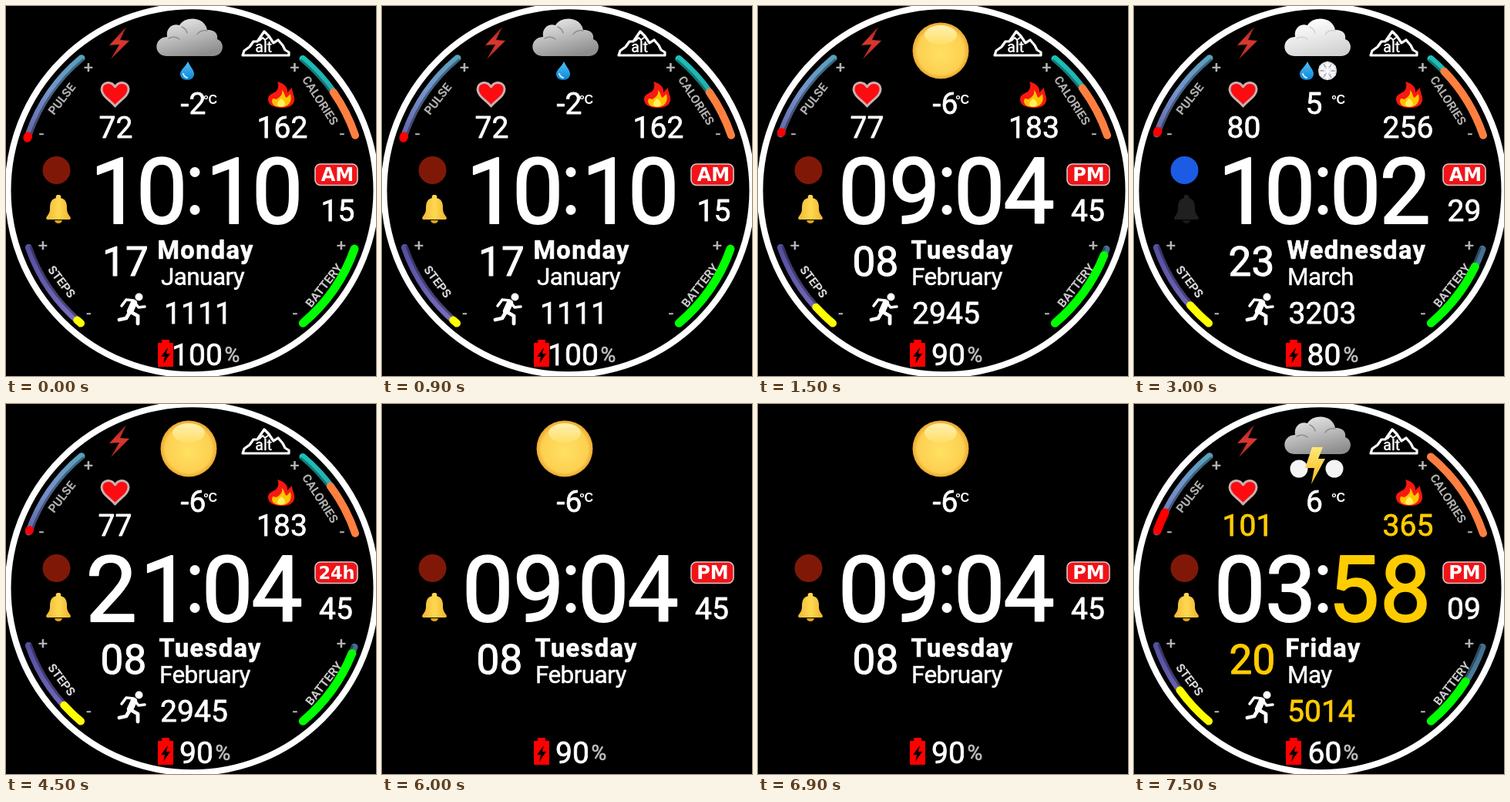
An HTML page with a canvas that plays this animation: 480x480 px, repeating every 8000 ms.

```html
<!DOCTYPE html>
<html lang="en">
<head>
<meta charset="utf-8">
<title>Watch face</title>
<style>
  html, body { margin: 0; width: 100%; height: 100%; overflow: hidden; background: #000; }
  canvas { display: block; width: 480px; height: 480px; }
</style>
</head>
<body>
<canvas id="face" width="480" height="480"></canvas>
<script>
const g = document.getElementById('face').getContext('2d');
const WHITE = '#fff', GOLD = '#ffcc00';
const LOOP = 8000, STEP = 1500;
const CX = 241, CY = 240, GAUGE_R = 224;

// Gauge ends are angles in degrees; text pairs hold [text, ink centre].
const monday = {
  sky: 'rain', temp: ['-2', 242.5], pulse: ['72', 142.5], kcal: ['162', 359.5],
  time: '1010', mode: 'AM', sec: ['15', 431.5], date: ['17', 156],
  day: 'Monday', month: 'January', steps: ['1111', 246.5], power: ['100', 248.5],
  ends: { pulse: 198.4, kcal: -34.9, steps: 131.6, power: 19.6 }
};
const tuesday = {
  sky: 'sun', temp: ['-6', 242.5], pulse: ['77', 141.5], kcal: ['183', 358.5],
  time: '0904', mode: 'PM', sec: ['45', 428], date: ['08', 152],
  day: 'Tuesday', month: 'February', steps: ['2945', 244], power: ['90', 246.5],
  ends: { pulse: 199.8, kcal: -36.6, steps: 137.7, power: 21.9 }
};
const wednesday = {
  sky: 'sleet', temp: ['5', 234], pulse: ['80', 142.5], kcal: ['256', 355.5],
  time: '1002', mode: 'AM', sec: ['29', 428], date: ['23', 152], linked: true, muted: true,
  day: 'Wednesday', month: 'March', steps: ['3203', 244], power: ['80', 246.5],
  ends: { pulse: 200.2, kcal: -43.9, steps: 138.6, power: 26 }
};
const friday = {
  sky: 'storm', temp: ['6', 234.5], pulse: ['101', 145], kcal: ['365', 355.5],
  time: '0358', mode: 'PM', sec: ['09', 428], date: ['20', 153], accent: GOLD,
  day: 'Friday', month: 'May', steps: ['5014', 244], power: ['60', 247.5],
  ends: { pulse: 206.2, kcal: -50, steps: 144.1, power: 32.4 }
};
const scenes = [
  monday, tuesday, wednesday,
  { ...tuesday, time: '2104', mode: '24h' },
  { ...tuesday, ambient: true },
  friday
];

const rad = deg => deg * Math.PI / 180;
const roboto = (size, weight = 400) => `${weight} ${size}px Roboto, sans-serif`;

// Places text by its inked box: side 0 = left edge, 0.5 = centre, 1 = right edge.
// The outline rounds the corners and adds a little weight.
function ink(text, x, y, font, { color = WHITE, side = 0.5, outline = 0 } = {}) {
  g.font = font;
  g.textAlign = 'left';
  const { actualBoundingBoxLeft: l, actualBoundingBoxRight: r } = g.measureText(text);
  const left = x + l - side * (l + r);
  g.fillStyle = g.strokeStyle = color;
  g.fillText(text, left, y);
  if (outline) {
    g.lineWidth = outline;
    g.lineJoin = 'round';
    g.strokeText(text, left, y);
  }
}

function digits([text, x], y, color, size = 39) {
  ink(text, x, y, roboto(size), { color, outline: size * 0.02 });
}

function disc(x, y, r, fill) {
  g.fillStyle = fill;
  g.beginPath();
  g.arc(x, y, r, 0, 2 * Math.PI);
  g.fill();
}

function shape(d, fill, stroke, width) {
  const p = new Path2D(d);
  if (fill) { g.fillStyle = fill; g.fill(p); }
  if (stroke) {
    g.strokeStyle = stroke;
    g.lineWidth = width;
    g.lineCap = g.lineJoin = 'round';
    g.stroke(p);
  }
}

function fade(x0, y0, x1, y1, ...colors) {
  const f = g.createLinearGradient(x0, y0, x1, y1);
  colors.forEach((c, i) => f.addColorStop(i / (colors.length - 1), c));
  return f;
}

function arc(from, to, color, width, r = GAUGE_R) {
  g.strokeStyle = color;
  g.lineWidth = width;
  g.lineCap = 'round';
  g.beginPath();
  g.arc(CX, CY, r, rad(Math.min(from, to)), rad(Math.max(from, to)));
  g.stroke();
}

function track(from, to, color) {
  arc(from, to, color, 9);
  arc(from, to, 'rgba(0, 0, 0, 0.35)', 3, GAUGE_R - 3);
}

function label(text, x, y, deg, color) {
  g.save();
  g.translate(x, y);
  g.rotate(rad(deg));
  ink(text, 0, 6, roboto(15.5, 700), { color });
  g.restore();
}

function gauges(ends) {
  label('PULSE', 72, 120, -52, '#b0b0b0');
  label('CALORIES', 408, 122, 57, '#b0b0b0');
  label('STEPS', 72.5, 357, 53, '#d8d8d8');
  label('BATTERY', 412, 362, -52, '#c8c8c8');

  track(199.3, 230.3, fade(30, 166, 98, 67, '#6468a8', '#7494cc', '#58a0bc'));
  track(-50, -19, fade(385, 67, 453, 168, '#1cc0b8', '#2e98a8'));
  track(130, 160.9, fade(30, 313, 98, 411, '#5450a0', '#7c70c0'));
  track(19.6, 49.9, fade(452, 315, 386, 412, '#43708f', '#5a90b0'));

  arc(ends.pulse < 199 ? 197.9 : 199.8, ends.pulse + 0.1, '#ff0000', 11);
  arc(-18.8, ends.kcal, '#ff7f40', 10);
  arc(130, ends.steps, '#ffff00', 10);
  arc(49.9, ends.power, '#00ff00', 11);

  for (const [s, x, y] of [
    ['+', 107, 86], ['-', 46, 172], ['+', 374.5, 86], ['-', 436, 172],
    ['+', 48, 317], ['-', 107.5, 405], ['+', 435, 317], ['-', 375, 405]
  ]) ink(s, x, y, roboto(21), { color: '#b8b8b8', outline: 0.6 });
}

function bezel() {
  g.strokeStyle = WHITE;
  g.lineWidth = 8;
  g.beginPath();
  g.arc(241.5, 239.3, 239, 0, 2 * Math.PI);
  g.stroke();
}

function cloud(light, dark) {
  shape('M208 65 C191 64 191 41 209 40 C207 28 217 22 225 25 C233 12 258 14 261 31 ' +
    'C273 31 275 38 274 43 C285 47 283 65 268 65 Z', fade(230, 17, 242, 66, light, dark));
  shape('M211 42 Q219 38 225 43 M228 27 Q234 30 235 35 M261 32 Q252 31 248 37', null, dark, 1.5);
}

function drop(x) {
  g.save();
  g.translate(x, 84);
  shape('M1 -12 C4 -5 9 -1 9 4 C9 9 5 12 0 12 C-5 12 -9 9 -9 4 C-9 -1 -2 -5 1 -12 Z',
    fade(0, -12, 0, 12, '#55c0f5', '#0a86d8'));
  shape('M-5 4 Q-4 8 0 9', null, '#c8efff', 2);
  g.restore();
}

function snowflake(x, y) {
  disc(x, y, 12, '#d4d8dc');
  for (let i = 0; i < 6; i++) {
    g.save();
    g.translate(x, y);
    g.rotate(i * Math.PI / 3);
    shape('M0 0 V-11 M-3 -9 L0 -6 L3 -9', null, '#f8f8f8', 2.4);
    shape('M3 -5 L5 -8', null, '#8c949c', 1);
    g.restore();
  }
}

function sun() {
  const f = g.createRadialGradient(237, 62, 4, 237, 58, 36.5);
  f.addColorStop(0, '#ffde60');
  f.addColorStop(0.8, '#fdd050');
  f.addColorStop(1, '#eba630');
  disc(237, 58, 36.5, f);
  g.fillStyle = fade(0, 25, 0, 50, '#fff0b0', '#ffdf68');
  g.beginPath();
  g.ellipse(237, 37.5, 21, 12.5, 0, 0, 2 * Math.PI);
  g.fill();
}

const skies = {
  sun,
  rain() { cloud('#e2e2e2', '#8e8e8e'); drop(235); },
  sleet() { cloud('#ffffff', '#d2d2d2'); drop(224); snowflake(251, 84); },
  storm() {
    cloud('#e2e2e2', '#8e8e8e');
    disc(214, 84, 11.5, '#f4f4f4');
    disc(260, 84, 11.5, '#f4f4f4');
    shape('M231 56 L245 56 L239 71 L248 71 L230 104 L234 83 L222 83 Z',
      fade(0, 56, 0, 104, '#ffe878', '#f8b818'));
  }
};

function bell(muted) {
  shape('M68 245 C71 245 72 247 71 249 C79 251 79 258 79 263 C79 269 82 271 84 275 ' +
    'Q84 277 81 277 H55 Q52 277 52 275 C54 271 57 269 57 263 C57 258 57 251 65 249 C64 247 65 245 68 245 Z',
    muted ? '#202020' : fade(52, 0, 84, 0, '#f0b834', '#ffd850', '#efb430'));
  shape('M63 278 H73 Q72 282 68 282 Q64 282 63 278 Z', muted ? '#1a1a1a' : '#e0a020');
}

function badge(mode) {
  g.beginPath();
  g.roundRect(401, 205, 55, 27.5, 7);
  g.fillStyle = '#f01418';
  g.fill();
  g.lineWidth = 1.6;
  g.strokeStyle = '#dcc8c8';
  g.stroke();
  const size = mode === '24h' ? 22.4 : 24;
  ink(mode, 429, 227, `bold ${size}px "DejaVu Sans", sans-serif`);
}

function battery() {
  g.fillStyle = '#ff0000';
  g.fillRect(197, 437, 20, 31);
  g.fillRect(202, 433, 10, 5);
  shape('M210 443 L201 455 H206 L204 464 L213 451 H208 Z', '#000');
}

function flame() {
  shape('M352 98 C362 101 366 106 365 112 L371 106 C371 112 375 117 374 123 C372 131 364 132 357 132 ' +
    'C347 132 340 128 340 121 C340 115 345 114 350 111 C354 107 354 102 352 98 Z', '#f81810');
  shape('M358 109 C362 113 361 117 364 119 L369 114 C372 125 366 131 357 131 ' +
    'C348 131 343 127 346 120 L351 121 C357 117 359 114 358 109 Z', '#ffc400');
  shape('M357 120 C363 124 364 130 357 131 C350 130 351 125 357 120 Z', '#fff060');
}

function runner() {
  disc(172.5, 377.5, 5, WHITE);
  shape('M166 385 L161 396', null, WHITE, 8.5);
  shape('M165 382 L156 381 L150 389 M168 386 L172 391 L180 390', null, WHITE, 3.6);
  shape('M162 397 L171 402 L171 412 M160 398 L156 405 L147 407', null, WHITE, 4.8);
}

function icons() {
  shape('M156 27 L134 51 L147 50 L136 69 L160 45 L148 44 Z',
    fade(150, 27, 144, 68, '#a82020', '#d83830', '#b02820'));
  shape('M141.5 130 C135 122 124 117 124 108 C124 99 136 96 141.5 105 ' +
    'C147 96 159 99 159 108 C159 117 148 122 141.5 130 Z', '#ff0a10', '#c8b0b0', 3);
  flame();
  shape('M307 64 L309 58 L316 53 L321 46 L326 46 L335 33 L341 39 L347 48 L353 44 L359 51 L362 57 L367 60 L367 64 Z',
    '#000', WHITE, 3.2);
  shape('M329 45 L333 41 L336 44 L340 41', null, WHITE, 1.8);
  ink('alt', 334.5, 60, roboto(19.5), { outline: 0.4 });
  runner();
}

function clock(time, accent) {
  [137, 202, 287, 352].forEach((x, i) => {
    const one = time[i] === '1';
    ink(time[i], one ? x + 14 : x, 281.5, roboto(118),
      { color: i > 1 ? accent : WHITE, side: one ? 1 : 0.5, outline: 2 });
  });
  disc(245, 215.5, 6.5, WHITE);
  disc(245, 264.5, 6.5, WHITE);
}

function temperature([text, x]) {
  digits([text, x], 139.5);
  ink('ºC', 265.5, 126.5, 'bold 16px "Liberation Sans", Arial, sans-serif');
}

function calendar(day, month) {
  g.letterSpacing = '1.4px';
  ink(day, 198.5, 328, roboto(32.5, 700), { side: 0, outline: 0.7 });
  g.letterSpacing = '-0.6px';
  ink(month, 201, 361.5, roboto(31.5), { side: 0, outline: 0.5 });
  g.letterSpacing = '0px';
}

function draw(s) {
  const accent = s.accent || WHITE;
  g.fillStyle = '#000';
  g.fillRect(0, 0, 480, 480);

  if (!s.ambient) {
    bezel();
    gauges(s.ends);
    icons();
    digits(s.pulse, 170.5, accent);
    digits(s.kcal, 170.5, accent);
    digits(s.steps, 411.5, accent);
  }

  skies[s.sky]();
  temperature(s.temp);
  disc(65.5, 213, 18, s.linked ? '#1c5ce4' : '#801808');
  bell(s.muted);
  clock(s.time, accent);
  badge(s.mode);
  digits(s.sec, 279);
  digits(s.date, 350, accent, 53);
  calendar(s.day, s.month);

  battery();
  digits(s.power, 466);
  ink('%', s.power[0].length > 2 ? 293.5 : 281.5, 461.5, roboto(27), { color: '#c0c0c0', outline: 0.6 });
}

function tick(now) {
  draw(scenes[Math.floor((now % LOOP) / STEP)]);
  requestAnimationFrame(tick);
}
tick(performance.now());
</script>
</body>
</html>
```
